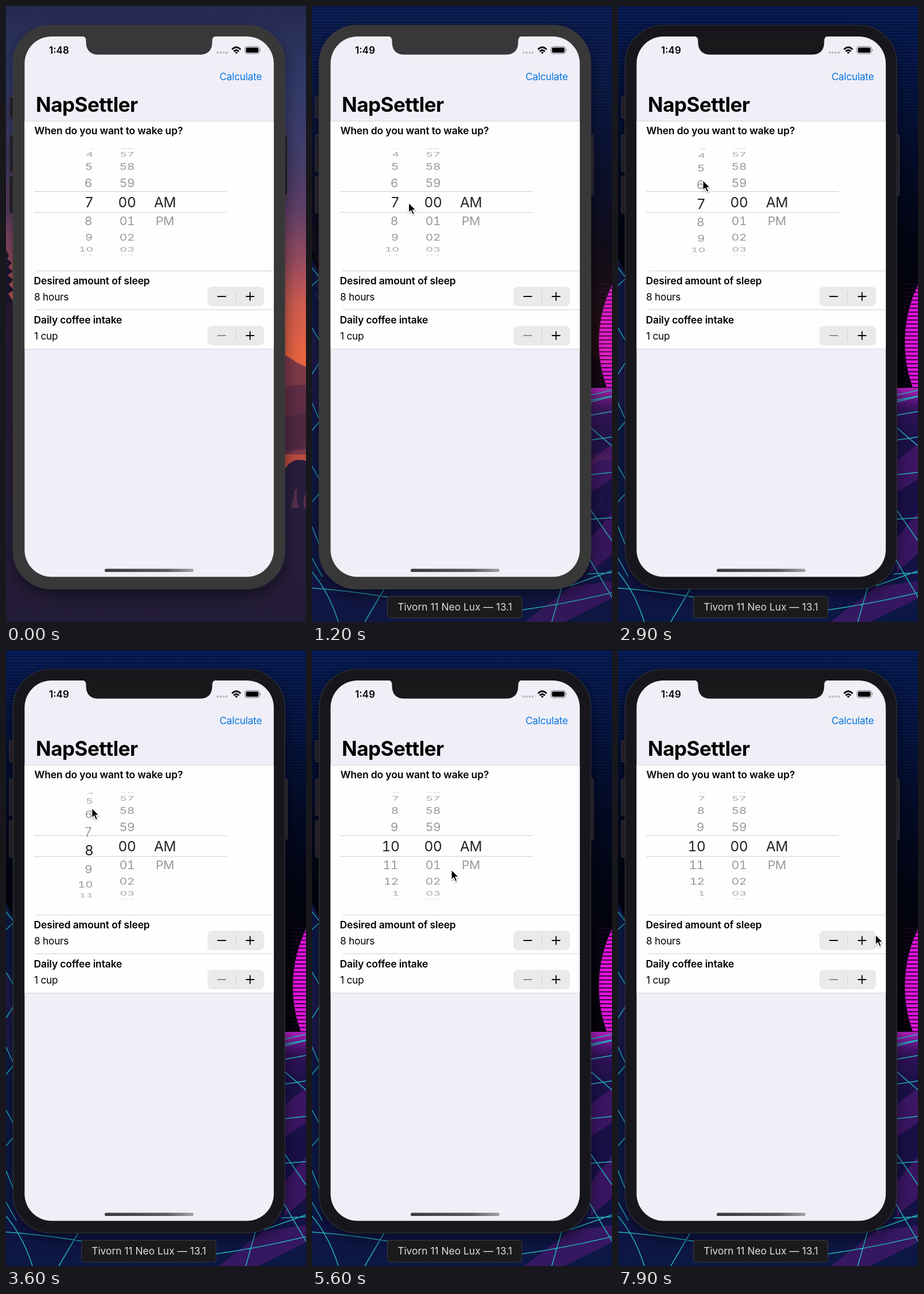
An HTML page for the animation above (8 s loop, 523x1071 px).

```html
<!DOCTYPE html>
<html lang="en">
<head>
<meta charset="utf-8">
<title>Sleep planner</title>
<style>
html, body { margin: 0; width: 100%; height: 100%; overflow: hidden; background: #0a1238; }
svg { display: block; width: 523px; height: 1071px; }
text { font-family: Inter, "Open Sans", sans-serif; white-space: pre; }
.body { font-size: 17.3px; letter-spacing: -.25px; }
.bold { font-size: 17.5px; font-weight: 600; letter-spacing: -.15px; }
.rule { stroke: #dddce1; stroke-width: 1.3; }
.grid path { fill: none; stroke: #24b4bd; stroke-width: 1.5; }
.pick { font-size: 24.5px; letter-spacing: -.4px; font-variant-numeric: tabular-nums; }
</style>
</head>
<body>
<svg id="stage" viewBox="0 0 523 1071"></svg>
<script>
const LOOP = 8000, STEP = 100;
const MID = 341, RADIUS = 94, TURN = 20.4 * Math.PI / 180;

// Piecewise linear tracks: [ms, value, ...]
const pointer = [
  [600, 186, 306], [1100, 169, 343], [1300, 168, 341], [1450, 165, 338], [1900, 153, 363],
  [2000, 152, 364], [2250, 149, 345], [2450, 148, 333], [2900, 148, 303], [3500, 149, 279],
  [4300, 154, 244], [4700, 158, 223], [4950, 172, 248], [5600, 243, 382], [6100, 330, 442],
  [6700, 414, 488], [7300, 444, 496], [7900, 449, 495]
];
const wheel = [
  [1450, 7], [1850, 6.22], [2000, 6.03], [2150, 6], [2450, 6], [2900, 6.92],
  [3500, 7.64], [4300, 8.7], [4700, 9.42], [4900, 9.82], [5100, 9.97], [5300, 10]
];
const sunsetFade = [[100, 1], [1350, 0]];

function track(points, t) {
  if (t <= points[0][0]) return points[0].slice(1);
  for (let i = 1; i < points.length; i++) {
    const a = points[i - 1], b = points[i];
    if (t <= b[0]) {
      const k = (t - a[0]) / (b[0] - a[0]);
      return a.slice(1).map((v, j) => v + (b[j + 1] - v) * k);
    }
  }
  return points[points.length - 1].slice(1);
}

const pad = n => String(n).padStart(2, "0");
const columns = {
  hour: { x: 152.4, end: true, label: i => ((i - 1) % 12 + 12) % 12 + 1 },
  minute: { x: 211, label: i => pad((i + 60) % 60) },
  half: { x: 277, label: i => ["AM", "PM"][i] || "" }
};

function rows({ x, end, label }, pos, big) {
  let out = "";
  for (let i = Math.floor(pos) - 5; i <= pos + 5; i++) {
    const a = (i - pos) * TURN, c = Math.cos(a);
    if (Math.abs(a) > 1.5 || label(i) === "") continue;
    const y = MID + RADIUS * Math.sin(a);
    const sx = big ? 1 : .87 * (.9 + .1 * c);
    const sy = big ? c : .87 * c;
    const px = big || !end ? x : x - 2.4 + 4 * (1 - c);
    const fade = big ? 1 : .25 + .75 * Math.min(1, c * 1.6);
    out += `<text class="pick" text-anchor="${end ? "end" : "middle"}" y="8.9"
      fill="${big ? "#242426" : "#98989c"}" opacity="${fade}"
      transform="translate(${px} ${y}) scale(${sx} ${sy})">${label(i)}</text>`;
  }
  return out;
}

const column = (col, pos) =>
  `<g clip-path="url(#outside)">${rows(col, pos, false)}</g>
   <g clip-path="url(#band)">${rows(col, pos, true)}</g>`;

const line = (x1, y, x2) => `<line class="rule" x1="${x1}" y1="${y}" x2="${x2}" y2="${y}"/>`;
const rect = (x, y, w, h, fill, extra = "") =>
  `<rect x="${x}" y="${y}" width="${w}" height="${h}" fill="${fill}" ${extra}/>`;
const gradient = (id, stops, attrs = 'x2="0" y2="1"') =>
  `<linearGradient id="${id}" ${attrs}>${stops.map(([o, c]) =>
    `<stop offset="${o}" stop-color="${c}"/>`).join("")}</linearGradient>`;

const stepper = (y, minus) => `
  ${rect(351, y, 99, 34, "#eaeaec", 'rx="8"')}
  ${rect(400, y + 8, 1, 18, "#cfcfd3")}
  <g stroke-width="1.9" stroke="#000">
    <path d="M368.5 ${y + 17}h15" stroke="${minus}"/>
    <path d="M418 ${y + 17}h15M425.5 ${y + 9.5}v15"/>
  </g>`;

const sunset = `
  <g id="sunset">
    ${rect(0, 0, 523, 1071, "url(#dusk)")}
    <path d="M470 604Q488 606 500 615T530 630V780H470Z" fill="#7c3847"/>
    <path d="M470 672Q500 652 530 662V770Q505 772 470 784Z" fill="#5f2d45"/>
    <path d="M470 712Q500 716 530 704V762Q505 772 470 776Z" fill="#502842"/>
    <path d="M478 820Q492 788 512 789T530 800V1071H470Z" fill="#281d3c"/>
    <path d="M496 873Q502 858 503 842L508 838Q505 858 511 873ZM519 873V856L523 846V873Z" fill="#553049"/>
    <path d="M0 520V424L5 434 2 440 10 446 4 454 12 462 3 468 13 476 5 484 14 494 4 500 16 520Z" fill="#1d1730"/>
    ${rect(0, 515, 40, 360, "url(#shade)")}
    ${rect(0, 874, 523, 197, "url(#soil)")}
  </g>`;

// Receding ground: cross lines that spread toward the viewer, then the fan
function ground() {
  let d = "";
  for (let i = 0; i < 7; i++) {
    const y = 674 + i * i * 8.6;
    d += `M480 ${y + 4}L523 ${y - 6 + i * 1.3}`;
  }
  for (const [a, b] of [[690, 679], [728, 765], [868, 930], [955, 1028]]) d += `M480 ${a}L523 ${b}`;
  for (const [a, b] of [[455, 478], [486, 470], [560, 590], [640, 612], [690, 730], [738, 716],
    [800, 832], [862, 842], [905, 950], [960, 992]]) d += `M0 ${a}L18 ${b}`;
  d += "M0 984Q30 1020 46 1071M0 1012Q60 1016 140 1029M128 1010L92 1071";
  return d + "M366 1050Q440 1040 523 1020M436 1008L418 1071M450 1008L523 982";
}

const synth = `
  ${rect(0, 0, 523, 670, "url(#night)")}
  ${rect(0, 0, 523, 450, "url(#scan)")}
  <circle cx="729" cy="585" r="229" fill="#e612df"/>
  ${rect(498, 480, 25, 188, "url(#slats)")}
  ${rect(0, 667, 523, 404, "url(#floor)")}
  <path d="M0 440L16 472V1000H0Z" fill="#0d1846"/>
  <path d="M0 560L20 610V700H0Z" fill="#1a194c"/>
  <path d="M486 790L523 762V822L486 846ZM486 925L523 880V952L486 985ZM370 1071L450 1010 523 1000V1030L440 1071Z" fill="#561a78" opacity=".55"/>
  ${rect(480, 664, 43, 40, "url(#glow)")}
  <g class="grid"><path d="${ground()}"/></g>`;

const phone = `
  <g filter="url(#shadow)">
    <g id="buttons" stroke="#38373b" stroke-width="1">
      ${[[6, 158, 36], [6, 224, 64], [6, 296, 64], [480, 224, 105]].map(([x, y, h]) =>
        rect(x, y, 10.5, h, "#201f25", 'rx="2"')).join("")}
    </g>
    <rect id="shell" x="12.5" y="33.5" width="473.5" height="980" rx="66" stroke-width="1.2"/>
  </g>
  <g clip-path="url(#screen)">
    ${rect(32, 52, 436, 942, "#f0eff7")}
    ${rect(32, 200, 436, 396, "#fefefe")}
    ${line(32, 200, 468)}${line(53, 460.5, 468)}${line(53, 528, 468)}${line(32, 596.5, 468)}
  </g>
  <path id="notch" d="M133 52.5Q139.5 53.5 139.5 60V63Q140 84.5 161 84.5H338Q359 84.5 359.5 63V60Q359.5 53.5 366 52.5Z"/>
  <text id="clock" x="75" y="83" font-size="17" font-weight="600"></text>
  <g fill="#b9b9be">${[0, 1, 2, 3].map(i => `<circle cx="${369 + i * 5.2}" cy="81" r="1.9"/>`).join("")}</g>
  <g fill="none" stroke="#000" stroke-width="2.7">
    <path d="M394 75.5Q401.5 68 409 75.5M397 79Q401.5 74.6 406 79"/>
    <path d="M399 80.7Q401.5 78.6 404 80.7L401.5 83.2Z" fill="#000" stroke="none"/>
  </g>
  <rect x="416.5" y="70.5" width="25.5" height="12.5" rx="3.6" fill="none" stroke="#77777b"/>
  ${rect(418.3, 72.3, 21.9, 8.9, "#000", 'rx="2.2"')}
  <path d="M443 74.5Q444.9 76.7 443 79Z" fill="#77777b"/>
  <text class="body" x="446" y="129" text-anchor="end" fill="#0a75e0">Calculate</text>
  <text x="52" y="183.5" font-size="35" font-weight="700" letter-spacing="-.5">NapSettler</text>
  <text class="bold" x="49.5" y="223">When do you want to wake up?</text>
  <text class="bold" x="48.5" y="484">Desired amount of sleep</text>
  <text class="body" x="49" y="511.5">8 hours</text>
  <text class="bold" x="48.5" y="552">Daily coffee intake</text>
  <text class="body" x="49" y="579.5">1 cup</text>
  <g id="hours"></g>
  ${column(columns.minute, 0)}${column(columns.half, 0)}
  ${rect(49, 322, 336, 1.2, "#d3d3d6")}${rect(49, 358.3, 336, 1.2, "#d3d3d6")}
  ${stepper(488, "#000")}${stepper(556, "#8b8b8f")}
  ${rect(172, 978.5, 155, 5.5, "url(#home)", 'rx="2.7"')}`;

const overlay = `
  <g id="badge">
    <rect x="131.5" y="1026.5" width="234.5" height="37.5" rx="4" fill="#1b1b1d" stroke="#3b3b40"/>
    <text x="249" y="1051" font-size="17.4" text-anchor="middle" fill="#dddddf">Tivorn 11 Neo Lux — 13.1</text>
  </g>
  <g id="arrow">
    <path d="M0 0V17.5L4 13.8 6.9 20.6 10 19.3 7.1 12.6H12.6Z" fill="#000"
      stroke="#fff" stroke-width="1.3" filter="url(#soft)"/>
  </g>`;

const defs = `<defs>
  ${gradient("dusk", [[0, "#252a50"], [.12, "#303a68"], [.24, "#423d6c"], [.33, "#603f68"],
    [.41, "#934a61"], [.48, "#cb5b51"], [.57, "#e8633f"], [.67, "#d85a3f"], [.73, "#bd4c40"], [1, "#241d38"]])}
  ${gradient("shade", [[0, "#2b1b36"], [1, "#271d3b"]])}
  ${gradient("soil", [[0, "#281e3d"], [1, "#231c36"]])}
  ${gradient("night", [[0, "#08205e"], [.2, "#061748"], [.42, "#030b28"], [.62, "#02040f"], [1, "#020107"]])}
  ${gradient("floor", [[0, "#4a1470"], [.08, "#34125c"], [.2, "#1c1148"], [.6, "#170f45"], [1, "#0b1844"]])}
  ${gradient("glow", [[0, "#b21fc0"], [.25, "#8a1ba0"], [1, "#4a147000"]])}
  ${gradient("home", [[0, "#3a393c"], [.7, "#5b5a5e"], [1, "#a3a2a8"]], "")}
  <pattern id="scan" width="20" height="5.3" patternUnits="userSpaceOnUse">
    <rect width="20" height="2.2" fill="#010518" opacity=".5"/>
  </pattern>
  <pattern id="slats" width="30" height="6.9" patternUnits="userSpaceOnUse">
    <rect width="30" height="1.8" fill="#1c0524"/>
  </pattern>
  <clipPath id="screen"><rect x="32.4" y="53" width="434.4" height="939.5" rx="47"/></clipPath>
  <clipPath id="band"><rect x="49" y="322.5" width="336" height="36"/></clipPath>
  <clipPath id="outside"><path d="M49 247H385V322.5H49ZM49 358.5H385V434H49Z"/></clipPath>
  <filter id="shadow" x="-20%" y="-20%" width="140%" height="140%">
    <feDropShadow dx="0" dy="9" stdDeviation="13" flood-color="#000" flood-opacity=".48"/>
  </filter>
  <filter id="soft" x="-50%" y="-50%" width="200%" height="200%">
    <feDropShadow dx="0" dy="1.5" stdDeviation="1.2" flood-opacity=".35"/>
  </filter>
</defs>`;

document.getElementById("stage").innerHTML = defs + synth + sunset + phone + overlay;

const el = {};
for (const id of ["sunset", "shell", "notch", "clock", "hours", "badge", "arrow"])
  el[id] = document.getElementById(id);

function draw(t) {
  const awake = t >= 600, active = t >= 1400;
  const shell = active ? "#19181a" : "#393739";
  const [x, y] = track(pointer, t);
  el.sunset.setAttribute("opacity", track(sunsetFade, t)[0]);
  el.shell.setAttribute("fill", shell);
  el.shell.setAttribute("stroke", active ? "#333236" : "#3e3c3f");
  el.notch.setAttribute("fill", shell);
  el.clock.textContent = awake ? "1:49" : "1:48";
  el.hours.innerHTML = column(columns.hour, track(wheel, t)[0]);
  el.badge.setAttribute("visibility", awake ? "visible" : "hidden");
  el.arrow.setAttribute("visibility", awake ? "visible" : "hidden");
  el.arrow.setAttribute("transform", `translate(${x} ${y})`);
}

const start = performance.now();
let shown = -1;
function tick() {
  const t = Math.floor((performance.now() - start) % LOOP / STEP) * STEP;
  if (t !== shown) draw(shown = t);
  requestAnimationFrame(tick);
}
tick();
</script>
</body>
</html>
```
